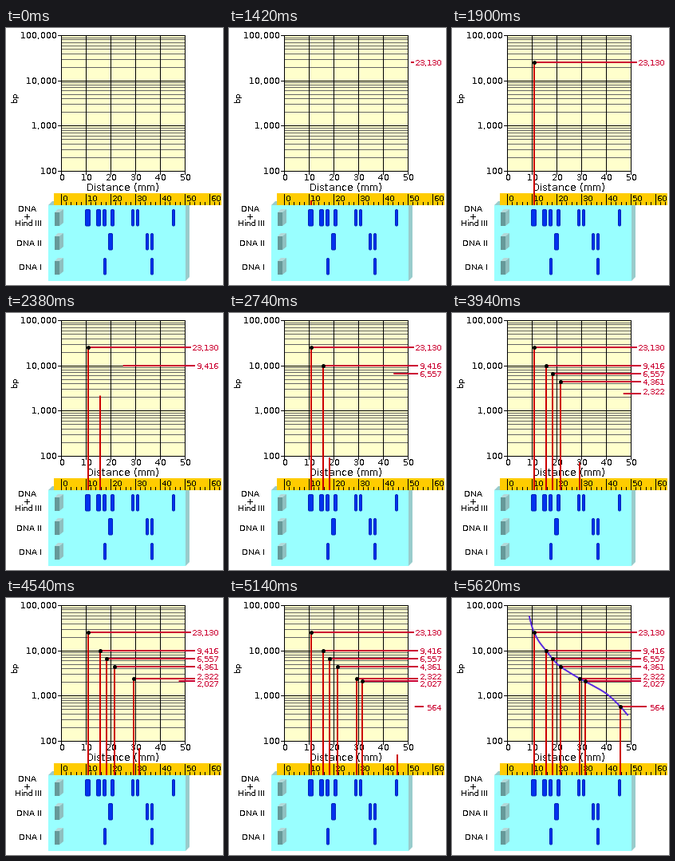
A matplotlib script for the animation above (5740 ms loop, 272 by 322 pixels).

```python
import numpy as np
import matplotlib.pyplot as plt
from matplotlib.animation import FuncAnimation
from matplotlib.collections import LineCollection
from matplotlib.patches import FancyBboxPatch, Polygon, Rectangle

W, H, DPI = 272, 322, 64
PX = 72 / DPI                      # points per pixel
TICK = 20                          # ms per frame
LOOP, START, STEP = 5740, 1420, 120
RED, DEEP_RED, BLUE = "#cc0033", "#cc0000", "#0033ee"
LEFT, RIGHT, TOP, BOTTOM = 69.5, 224.5, 9.5, 179.5
MM = (RIGHT - LEFT) / 50           # pixels per millimetre

# label, marker x, marker y, right end of line, label x, label baseline
MARKERS = [
    ("23,130", 103, 43, 232, 233, 47),
    ("9,416", 118, 66, 237, 239, 70),
    ("6,557", 126, 76, 237, 239, 80),
    ("4,361", 136, 86, 237, 239, 90),
    ("2,322", 160, 101, 237, 239, 102),
    ("2,027", 167, 104, 237, 239, 111),
    ("564", 211, 136, 244, 248, 141),
]
RULER_Y = 222
STUB_X, STUB_Y = 4, 6              # lengths at the first step

plt.rcParams.update({
    "font.family": "DejaVu Sans",
    "text.antialiased": False,
    "text.hinting": "default",
    "text.hinting_factor": 1,
})
fig = plt.figure(figsize=(W / DPI, H / DPI), dpi=DPI, facecolor="white")
ax = fig.add_axes([0, 0, 1, 1])
ax.set_xlim(0, W)
ax.set_ylim(H, 0)
ax.axis("off")


def text(x, y, s, size, color="black", ha="left", z=4, **kw):
    return ax.text(x, y, s, size=size * PX, color=color, ha=ha,
                   va="baseline", zorder=z, **kw)


def box(x0, y0, x1, y1, color, z=1):
    ax.add_patch(Rectangle((x0, y0), x1 - x0, y1 - y0, fc=color, lw=0, zorder=z))


def poly(points, color, z=1):
    ax.add_patch(Polygon(points, fc=color, lw=0, zorder=z))


def lines(segments, color="black", width=1, z=2):
    coll = LineCollection(segments, colors=color, linewidths=width * PX, zorder=z)
    coll.set_snap(False)
    ax.add_collection(coll, autolim=False)
    return coll


def draw_chart():
    box(69, 9, 225, 180, "#ffffcc")
    decade = (BOTTOM - TOP) / 3
    minor, major = [], []
    for d in range(4):
        base = BOTTOM - d * decade
        y = np.floor(base) + 0.5
        major.append([(LEFT - 4.5, y), (RIGHT + 0.5, y)])
        text(64, y + 3.5, f"{10 ** (d + 2):,}", 11, ha="right")
        if d < 3:
            for k in range(2, 10):
                y = np.floor(base - decade * np.log10(k)) + 0.5
                minor.append([(LEFT, y), (RIGHT, y)])
    for mm in range(0, 51, 10):
        x = LEFT + mm * MM
        major.append([(x, TOP), (x, BOTTOM + 4.5)])
        text(x + 0.5, 191, str(mm), 11, ha="center")
    lines(minor, "#666666")
    lines(major)
    text(101, 204, "Distance (mm)", 12)
    text(14, 87, "bp", 10, ha="center", rotation=90, rotation_mode="anchor")


def draw_well(y):
    box(61, y + 4, 67, y + 21, "#669999", 2)
    poly([(61, y + 4), (65, y), (72, y), (67, y + 4)], "#b3d9d9", 2)
    poly([(67, y + 4), (72, y), (72, y + 17), (67, y + 21)], "#8fbfbf", 2)


def draw_band(x0, x1, y):
    band = FancyBboxPatch((x0 + 0.5, y + 0.5), x1 - x0 - 1, 20.5,
                          boxstyle="round,pad=0,rounding_size=1.5",
                          fc=BLUE, ec="#0022bb", lw=PX, zorder=3)
    band.set_snap(False)
    ax.add_patch(band)


def draw_gel():
    poly([(53, 222), (58, 217), (230, 217), (230, 312), (225, 317)], "#99cccc")
    box(53, 222, 225, 317, "#99ffff")
    rows = [
        (227, [(99, 106), (113, 119), (121, 126), (131, 136),
               (157, 161), (163, 167), (208, 212)]),
        (257, [(128, 134), (175, 179), (181, 185)]),
        (288, [(122, 126), (181, 185)]),
    ]
    for y, bands in rows:
        draw_well(y)
        for x0, x1 in bands:
            draw_band(x0, x1, y)
    text(27, 230, "DNA", 10, ha="center")
    text(26, 240, "+", 10, ha="center")
    text(45, 248, "Hind III", 10, ha="right")
    text(45, 273, "DNA II", 10, ha="right")
    text(45, 303, "DNA I", 10, ha="right")


def draw_ruler():
    box(60, 207, 270, RULER_Y, "#ffcc00", 2)
    ticks = []
    for mm in range(0, 65, 2):
        x = np.floor(LEFT + mm * MM) + 0.5
        long = mm % 10 == 0
        ticks.append([(x, 208 if long else 218), (x, RULER_Y)])
        if long:
            text(x + 1.5, 217, str(mm), 10)
    lines(ticks, z=3)


def smooth(points, n=12):
    """Catmull-Rom curve through the points."""
    p = np.array(points, float)
    p = np.vstack([2 * p[0] - p[1], p, 2 * p[-1] - p[-2]])
    t = np.linspace(0, 1, n)[:, None]
    parts = []
    for a, b, c, d in zip(p, p[1:], p[2:], p[3:]):
        parts.append(0.5 * (2 * b + (c - a) * t + (2 * a - 5 * b + 4 * c - d) * t ** 2
                            + (3 * b - a - 3 * c + d) * t ** 3))
    return np.vstack(parts)


draw_chart()
draw_gel()
draw_ruler()

labels = [text(m[4], m[5], m[0], 10, RED) for m in MARKERS]
guides = lines([], [RED, DEEP_RED], 2, 6)    # horizontal and vertical in turn
fit = smooth([(97, 23.5), (99.3, 33), (103, 43), (109, 54.5), (118, 66), (126, 76),
              (136, 86), (160, 101), (167, 104.5), (193, 119.5), (211, 136),
              (220, 146.5)])
curve, = ax.plot(*fit.T, color="#5a2be0", lw=2 * PX, zorder=7)
dots, = ax.plot([], [], "o", color="black", ms=5 * PX, mew=0, zorder=8)


def update(frame):
    n = (frame * TICK - START) // STEP
    active, step = divmod(n, 5)
    segments, done = [], []
    for i, (_, x, y, end, _, _) in enumerate(MARKERS):
        labels[i].set_visible(i <= active)
        if i > active:
            continue
        f = 1 if i < active else step / 4
        reach = STUB_X + f * (end - x - STUB_X)
        rise = STUB_Y + f * (RULER_Y - y - STUB_Y)
        segments += [[(end, y), (end - reach, y)],
                     [(x, RULER_Y), (x, RULER_Y - rise)]]
        if f == 1:
            done.append((x + 0.3, y + 0.3))
    guides.set_segments(segments)
    dots.set_data([p[0] for p in done], [p[1] for p in done])
    curve.set_visible(active >= len(MARKERS))
    return [*labels, guides, dots, curve]


def reset():
    return update(0)


anim = FuncAnimation(fig, update, frames=LOOP // TICK, init_func=reset,
                     interval=TICK, repeat=True, repeat_delay=0, blit=False)
plt.show()
```
